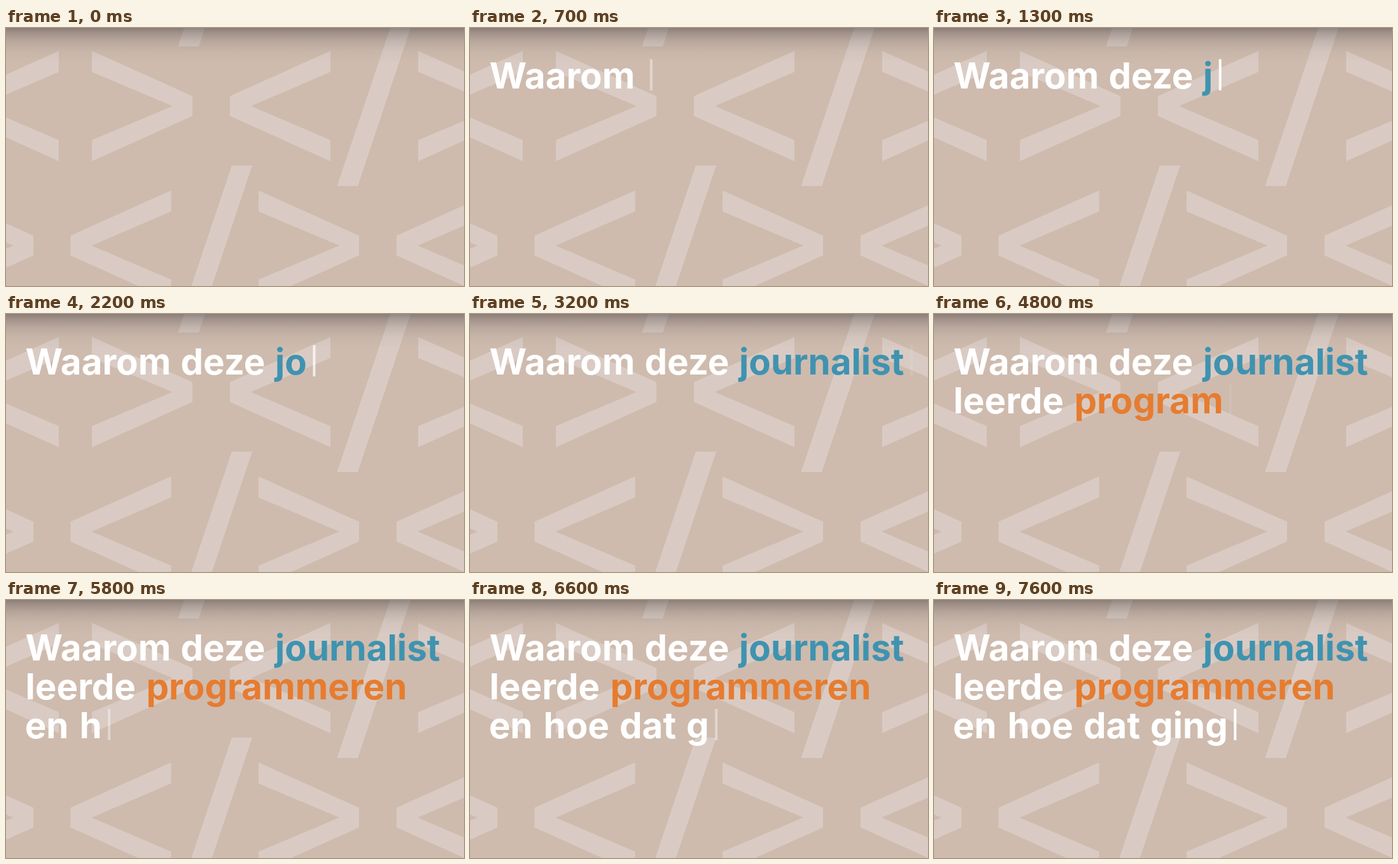
Write an HTML page that moves like this. It is 720 by 405 pixels and loops after 7700 ms.

```html
<!DOCTYPE html>
<html lang="nl">
<head>
<meta charset="utf-8">
<title>Typed headline</title>
<style>
  html, body { margin: 0; width: 100%; height: 100%; overflow: hidden; background: #cebbae; }
  svg { display: block; width: 100vw; height: 100vh; }
  text { font: 700 56.5px Inter, Roboto, sans-serif; font-optical-sizing: none; }
</style>
</head>
<body>
<svg viewBox="0 0 720 405">
  <defs>
    <path id="lt" d="M510 36 352 107V138L510 209V176L385 122.5 510 69Z"/>
    <path id="gt" d="M135 36 293 107V138L135 209V176L262 122.5 135 69Z"/>
    <path id="slash" d="M605-3H637L553 248H520.5Z"/>
    <linearGradient id="shade" x1="0" y1="0" x2="0" y2="1">
      <stop offset="0" stop-color="#2a2428" stop-opacity=".41"/>
      <stop offset=".15" stop-color="#2a2428" stop-opacity=".27"/>
      <stop offset=".38" stop-color="#2a2428" stop-opacity=".13"/>
      <stop offset=".65" stop-color="#2a2428" stop-opacity=".04"/>
      <stop offset="1" stop-color="#2a2428" stop-opacity="0"/>
    </linearGradient>
  </defs>
  <rect width="720" height="405" fill="#cebbae"/>
  <g fill="#d9cbc3">
    <use href="#lt" x="-427"/>
    <use href="#gt"/>
    <use href="#lt"/>
    <use href="#slash"/>
    <use href="#gt" x="513"/>
    <use href="#slash" x="-250" y="-219"/>
    <use href="#gt" x="-250" y="219"/>
    <use href="#lt" x="-250.5" y="219"/>
    <use href="#slash" x="-250" y="219"/>
    <use href="#gt" x="262" y="219"/>
    <use href="#lt" x="262" y="219"/>
  </g>
  <rect width="720" height="55" fill="url(#shade)"/>
  <g id="headline"></g>
  <rect id="cursor" width="4" height="49" fill="#fff"/>
</svg>
<script>
const LOOP = 7700, STEP = 100, BLINK = 800;
const WHITE = '#fff', TEAL = '#3f93b0', ORANGE = '#e67c30';
const SPACE = 14, CURSOR_GAP = 9.5;

// word, left, line, colour
const words = [
  ['Waarom', 30.5, 0, WHITE],
  ['deze', 274.5, 0, WHITE],
  ['journalist', 423, 0, TEAL],
  ['leerde', 30.5, 1, WHITE],
  ['programmeren', 220.5, 1, ORANGE],
  ['en', 29.7, 2, WHITE],
  ['hoe', 115.5, 2, WHITE],
  ['dat', 235, 2, WHITE],
  ['ging', 340, 2, WHITE]
];

// time in ms, typed characters; the count falls while text is deleted
const typing = [
  [200, 2], [1300, 13], [1800, 20], [2200, 14], [2300, 11], [2500, 11],
  [2600, 13], [3200, 22], [3300, 22], [5800, 47], [6800, 58]
];

const headline = document.getElementById('headline');
const cursor = document.getElementById('cursor');

let start = 0;
const items = words.map(([word, x, line, fill]) => {
  const el = document.createElementNS('http://www.w3.org/2000/svg', 'text');
  el.setAttribute('x', x);
  el.setAttribute('y', 95 + 61 * line);
  el.setAttribute('fill', fill);
  headline.append(el);
  const item = { el, word, x, line, start };
  start += word.length + 1;
  return item;
});

function typedCount(t) {
  if (t < typing[0][0]) return 0;
  const i = typing.findIndex(key => key[0] > t);
  if (i < 0) return typing[typing.length - 1][1];
  const [t0, n0] = typing[i - 1], [t1, n1] = typing[i];
  return Math.floor(n0 + (n1 - n0) * (t - t0) / (t1 - t0) + 1e-6);
}

function draw(t) {
  const count = typedCount(t);
  let last = null;
  for (const item of items) {
    const shown = item.word.slice(0, Math.max(0, count - item.start));
    if (item.el.textContent !== shown) item.el.textContent = shown;
    if (shown) last = item;
  }
  const pulse = Math.abs(Math.sin(Math.PI * (t - 50) / BLINK)) ** 1.6;
  cursor.setAttribute('opacity', last ? pulse.toFixed(3) : 0);
  if (!last) return;
  const trailing = count > last.start + last.word.length ? SPACE : 0;
  cursor.setAttribute('x', last.x + last.el.getComputedTextLength() + CURSOR_GAP + trailing);
  cursor.setAttribute('y', 49 + 61 * last.line);
}

const origin = performance.now();
function tick() {
  const t = (performance.now() - origin) % LOOP;
  draw(Math.floor(t / STEP) * STEP);
  requestAnimationFrame(tick);
}
tick();
</script>
</body>
</html>
```
